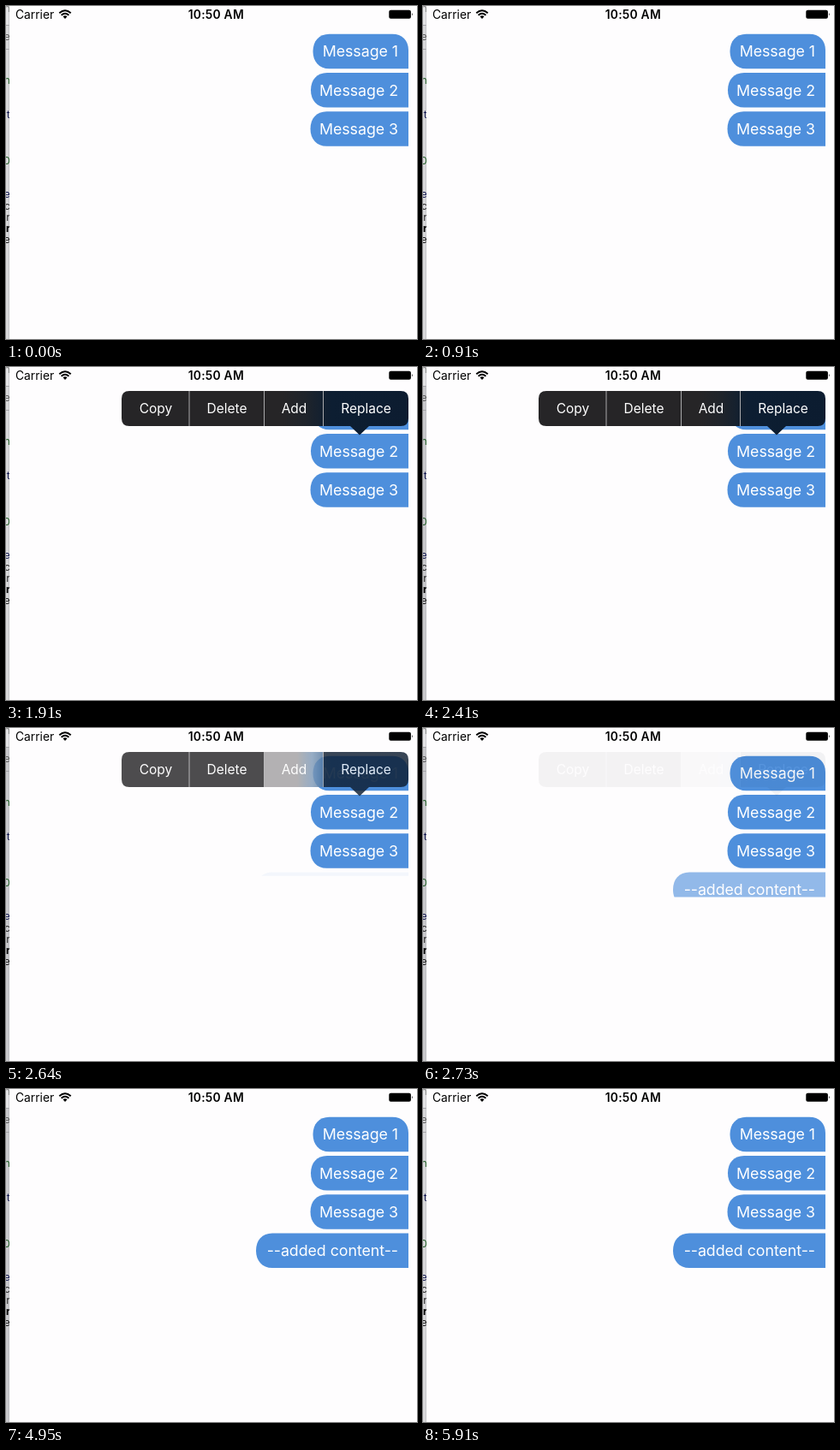
An HTML page that plays this animation: 480x389 px, repeating every 5960 ms.

```html
<!DOCTYPE html>
<html lang="en">
<head>
<meta charset="utf-8">
<title>Message menu</title>
<style>
  html, body { margin: 0; width: 100%; height: 100%; overflow: hidden; background: #fefdfe; }
  svg { display: block; width: 100%; height: 100%; font-family: Inter, "Open Sans", sans-serif; }
  .bubble path { fill: #4e8fdc; }
  .bubble text { fill: #fff; font-size: 17.8px; letter-spacing: -.04px; text-anchor: end; }
  .status text { font-size: 13.8px; fill: #000; }
  .status .clock { font-weight: 600; letter-spacing: .25px; text-anchor: middle; }
  #menu text { fill: #fff; font-size: 15.5px; text-anchor: middle; }
  #side text { font-size: 12px; text-anchor: end; }
</style>
</head>
<body>
<svg viewBox="0 0 480 389">
  <defs>
    <linearGradient id="dark" gradientUnits="userSpaceOnUse" x1="135" x2="470" y1="0" y2="0">
      <stop offset=".56" stop-color="#262527"/>
      <stop offset=".64" stop-color="#1f242b"/>
      <stop offset=".73" stop-color="#0d1e32"/>
      <stop offset="1" stop-color="#0c1c30"/>
    </linearGradient>
    <linearGradient id="light" gradientUnits="userSpaceOnUse" x1="302" x2="371" y1="0" y2="0">
      <stop offset=".55" stop-color="#a3a1a3"/>
      <stop offset=".8" stop-color="#809bb8"/>
      <stop offset="1" stop-color="#56799f"/>
    </linearGradient>
    <clipPath id="strip"><rect width="4" height="389"/></clipPath>
    <clipPath id="reveal"><rect id="window" x="280" y="168" width="200" height="0"/></clipPath>
  </defs>

  <rect width="480" height="389" fill="#fefdfe"/>

  <g id="side" clip-path="url(#strip)">
    <rect id="shade" width="4" height="389"/>
    <rect width="4" height="22" fill="#e4e4e6"/>
    <path d="M0 22.5H4M0 50.5H4" stroke="#a5a5a8"/>
    <path d="M3.7 0V389" stroke="#b4b4b8" stroke-width=".7"/>
  </g>

  <g class="status">
    <text x="11" y="15">Carrier</text>
    <text class="clock" x="245.3" y="15">10:50 AM</text>
    <path d="M62.3 8.2Q69 2.2 75.7 8.2M64.6 10.7Q69 6.8 73.4 10.7" fill="none" stroke="#000" stroke-width="1.9"/>
    <path d="M66.5 12.3Q69 10.2 71.5 12.3L69 15Z"/>
    <rect x="447.3" y="4.7" width="25.6" height="10" rx="2"/>
    <path d="M474 8Q475.6 9.7 474 11.5Z"/>
  </g>

  <g id="list"></g>
  <g clip-path="url(#reveal)"><g id="added"></g></g>

  <g id="menu">
    <path fill="url(#dark)" d="M144 28H461Q470 28 470 37V60Q470 69 461 69H424L413 79.5L402 69H144Q135 69 135 60V37Q135 28 144 28Z"/>
    <rect id="pressed" x="302" y="28" width="68.5" height="41" fill="url(#light)"/>
    <path d="M214 28V69M301.5 28V69M370.5 28V69" stroke="#a9a9ab"/>
  </g>
</svg>

<script>
const LOOP = 5960;
const $ = id => document.getElementById(id);

function add(parent, tag, attrs, text = "") {
  const el = document.createElementNS("http://www.w3.org/2000/svg", tag);
  for (const key in attrs) el.setAttribute(key, attrs[key]);
  el.textContent = text;
  parent.append(el);
  return el;
}

// Rounded on the left, and at the top right when corner is set; returns the label
function bubble(parent, x, y, text, corner = 0) {
  const g = add(parent, "g", { class: "bubble" });
  add(g, "path", { d: `M${x + 19} ${y}H${470 - corner}c${corner * .63} 0 ${corner} ${corner * .4} ${corner} ${corner}V${y + 40.5}H${x + 19}
    C${x + 7} ${y + 40.5} ${x} ${y + 32} ${x} ${y + 20.2}S${x + 7} ${y} ${x + 19} ${y}Z` });
  return add(g, "text", { x: 458, y: y + 26.5 }, text);
}

const covered = bubble($("list"), 358.5, 32.7, "Message 1", 19);
bubble($("list"), 356, 78, "Message 2");
bubble($("list"), 355.5, 123.2, "Message 3");
bubble($("added"), 292, 168.5, "--added content--");

[["Copy", 175], ["Delete", 258], ["Add", 336.5], ["Replace", 420.5]]
  .forEach(([label, x]) => add($("menu"), "text", { x, y: 54 }, label));

[["n", 7, "#888"], ["e", 40, "#555"], ["n", 91, "#1f5c25"], ["t", 131, "#10164f"], ["0", 185, "#1f5c25"],
 ["e", 224, "#10164f"], ["c", 238, "#222"], ["r", 251, "#222"], ["r", 264, "#000", 700], ["e", 277, "#111"]]
  .forEach(([s, y, fill, weight = 400]) => add($("side"), "text", { x: 4.8, y, fill, "font-weight": weight }, s));

// Smooth progress from 0 to 1 between two times
function ease(t, from, to) {
  const p = Math.min(1, Math.max(0, (t - from) / (to - from)));
  return p * p * (3 - 2 * p);
}

function draw(now) {
  const t = now % LOOP;
  const shown = ease(t, 1435, 1635) - ease(t, 2600, 2750);
  $("menu").setAttribute("opacity", shown);
  covered.setAttribute("opacity", 1 - shown * shown);
  $("pressed").setAttribute("opacity", t >= 2540 ? 1 : 0);

  const p = ease(t, 2610, 2820);
  $("added").setAttribute("opacity", p);
  $("window").setAttribute("height", p && 2 + 45 * p);

  $("shade").setAttribute("fill", t > 2300 && t < 5000 ? "#c8c8cb" : "#d8d8da");
  requestAnimationFrame(draw);
}
requestAnimationFrame(draw);
</script>
</body>
</html>
```
